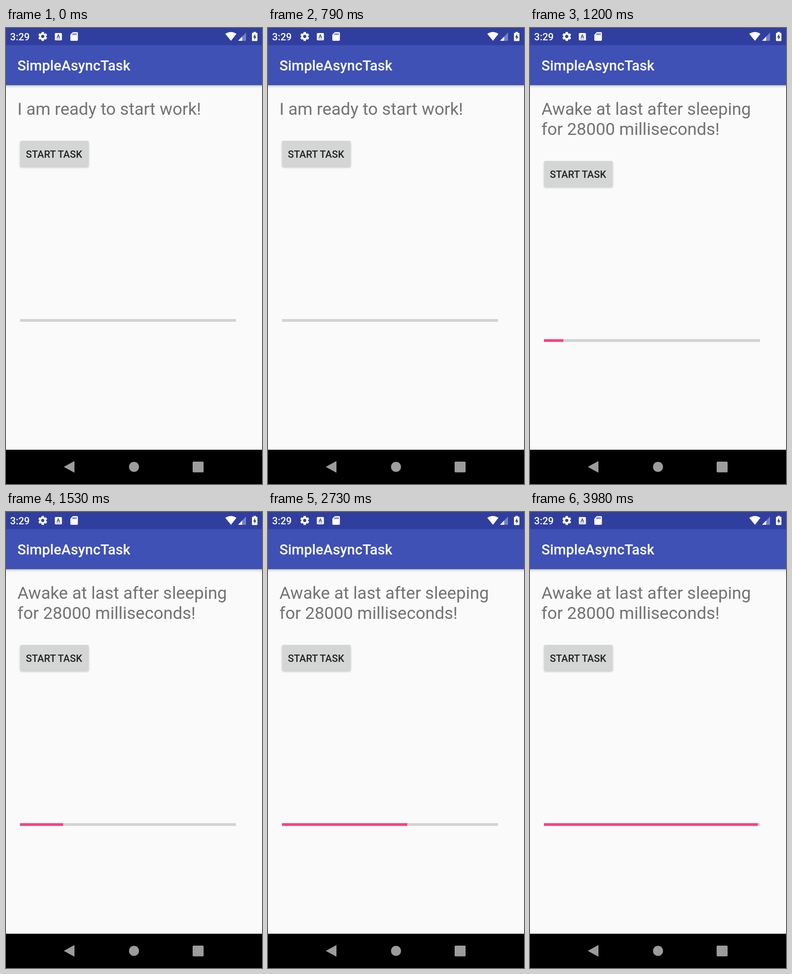
An HTML page for the animation above (4.1 s loop, 561 px wide and 998 px high).

```html
<!DOCTYPE html>
<html lang="en">
<head>
<meta charset="utf-8">
<title>Async task demo</title>
<style>
  html, body { margin: 0; width: 100%; height: 100%; overflow: hidden; background: #fafafa; }
  svg { display: block; width: 100vw; height: 100vh; }
  text { font-family: Roboto, sans-serif; }
  .medium { font-weight: 500; }
</style>
</head>
<body>
<svg viewBox="0 0 561 998">
  <defs>
    <linearGradient id="shade" x2="0" y2="1">
      <stop stop-color="#000" stop-opacity=".27"/>
      <stop offset=".4" stop-color="#000" stop-opacity=".09"/>
      <stop offset="1" stop-color="#000" stop-opacity="0"/>
    </linearGradient>
    <clipPath id="face"><rect x="31" y="247" width="150" height="56.5" rx="3"/></clipPath>
    <filter id="blur" x="-20%" y="-40%" width="140%" height="180%"><feGaussianBlur stdDeviation="2"/></filter>
  </defs>
  <rect width="561" height="998" fill="#fafafa"/>

  <!-- App bar -->
  <rect y="125" width="561" height="7" fill="url(#shade)"/>
  <rect width="561" height="125" fill="#3f51b5"/>
  <rect width="561" height="37.5" fill="#303f9f"/>
  <text class="medium" x="25" y="93" font-size="31.2" fill="#fff">SimpleAsyncTask</text>

  <!-- Status icons -->
  <g fill="#fff">
    <text class="medium" x="9" y="27" font-size="21.8">3:29</text>
    <g id="gear" transform="translate(80.5 18.5)"><circle r="7.4"/></g>
    <rect x="107" y="11" width="15.5" height="16" rx="1.8"/>
    <path d="M146.5 9H155.5Q157.5 9 157.5 11V26Q157.5 28 155.5 28H143Q141 28 141 26V14.5Z"/>
    <path d="M480.5 12.8Q493 4.8 505 12.8L493 28Z"/>
    <path d="M526 10V28H508.500Z" opacity=".35"/>
    <path d="M517.500 18.700V28H508.500Z"/>
    <path d="M542.500 10.500V8.500H547.500V10.500H549.500Q551 10.500 551 12V27Q551 28.500 549.500 28.500H540.500Q539 28.500 539 27V12Q539 10.500 540.500 10.500Z"/>
  </g>
  <g fill="#303f9f">
    <circle cx="80.5" cy="18.5" r="3.4"/>
    <text x="114.700" y="22" font-size="11.500" font-weight="700" text-anchor="middle">A</text>
    <path d="M111 23.500h1.700v1.500h-1.700zM114 23.500h1.700v1.500h-1.700zM117 23.500h1.700v1.500h-1.700z"/>
    <path d="M146 11.500h1.800v4h-1.800zM149.300 11.500h1.800v4h-1.800zM152.600 11.500h1.800v4h-1.800z"/>
    <path d="M546 13L541.500 20.700H544.400V26L548.700 18.500H546Z"/>
  </g>

  <!-- Content -->
  <g font-size="37.4" fill="#737373">
    <text id="line1" x="25" y="190"></text>
    <text id="line2" x="25" y="234"></text>
  </g>
  <g id="below">
    <rect id="shadow" x="31" y="249" width="150" height="56" rx="3" filter="url(#blur)"/>
    <rect x="31" y="247" width="150" height="56.5" rx="3" fill="#d4d5d5"/>
    <g clip-path="url(#face)"><circle id="ripple" cx="117" cy="277"/></g>
    <text class="medium" x="43.5" y="283.5" font-size="21.8" fill="#212121">START TASK</text>
    <rect x="30.5" y="637" width="473.5" height="6" fill="#d3d3d3"/>
    <rect id="bar" x="30.5" y="637" height="6" fill="#ff4081"/>
  </g>

  <!-- Navigation bar -->
  <rect y="923" width="561" height="75" fill="#000"/>
  <g fill="#9c9c9f">
    <path d="M127.500 960.500L149.500 948.500V972.500Z" stroke="#9c9c9f" stroke-linejoin="round"/>
    <circle cx="280.500" cy="960.500" r="11"/>
    <rect x="409" y="949" width="24" height="23.500" rx="2"/>
  </g>
</svg>
<script>
const LOOP = 4100, FRAME = 540 / 13;
const TAP = 905, AWAKE = 940;
// [ms, percent]
const PROGRESS = [[930, 0], [990, 2], [1530, 20], [2150, 40], [2230, 43],
  [2690, 57], [3230, 75], [3770, 93], [3980, 99], [LOOP, 99]];
const $ = id => document.getElementById(id);
const set = (id, attrs) => {
  for (const name in attrs) $(id).setAttribute(name, attrs[name]);
};

for (let angle = 0; angle < 360; angle += 60)
  $("gear").insertAdjacentHTML("beforeend",
    `<path d="M-2.500 -9.700H2.500L3.300 -5H-3.300Z" transform="rotate(${angle})"/>`);

function percentAt(t) {
  if (t <= PROGRESS[0][0]) return 0;
  const i = PROGRESS.findIndex(([time]) => time >= t);
  const [t0, p0] = PROGRESS[i - 1], [t1, p1] = PROGRESS[i];
  return Math.round(p0 + (p1 - p0) * (t - t0) / (t1 - t0));
}

function draw(now) {
  const time = now % LOOP;
  const t = Math.max(0, 30 + Math.floor((time - 25) / FRAME) * FRAME);
  const awake = t >= AWAKE;
  $("line1").textContent = awake ? "Awake at last after sleeping" : "I am ready to start work!";
  $("line2").textContent = awake ? "for 28000 milliseconds!" : "";
  set("below", { transform: `translate(0 ${awake ? 44 : 0})` });
  set("bar", { width: 473.5 * percentAt(t) / 100 });

  const age = t - TAP;
  const pressed = age > -10 && age < 150;
  const fade = Math.min(1, Math.max(0, (150 - age) / 60));
  set("ripple", { r: pressed ? Math.max(0, 20 + age * 0.75) : 0, opacity: 0.17 * fade });
  set("shadow", { opacity: pressed ? 0.24 + 0.2 * fade : 0.24 });
  requestAnimationFrame(draw);
}
requestAnimationFrame(draw);
</script>
</body>
</html>
```
